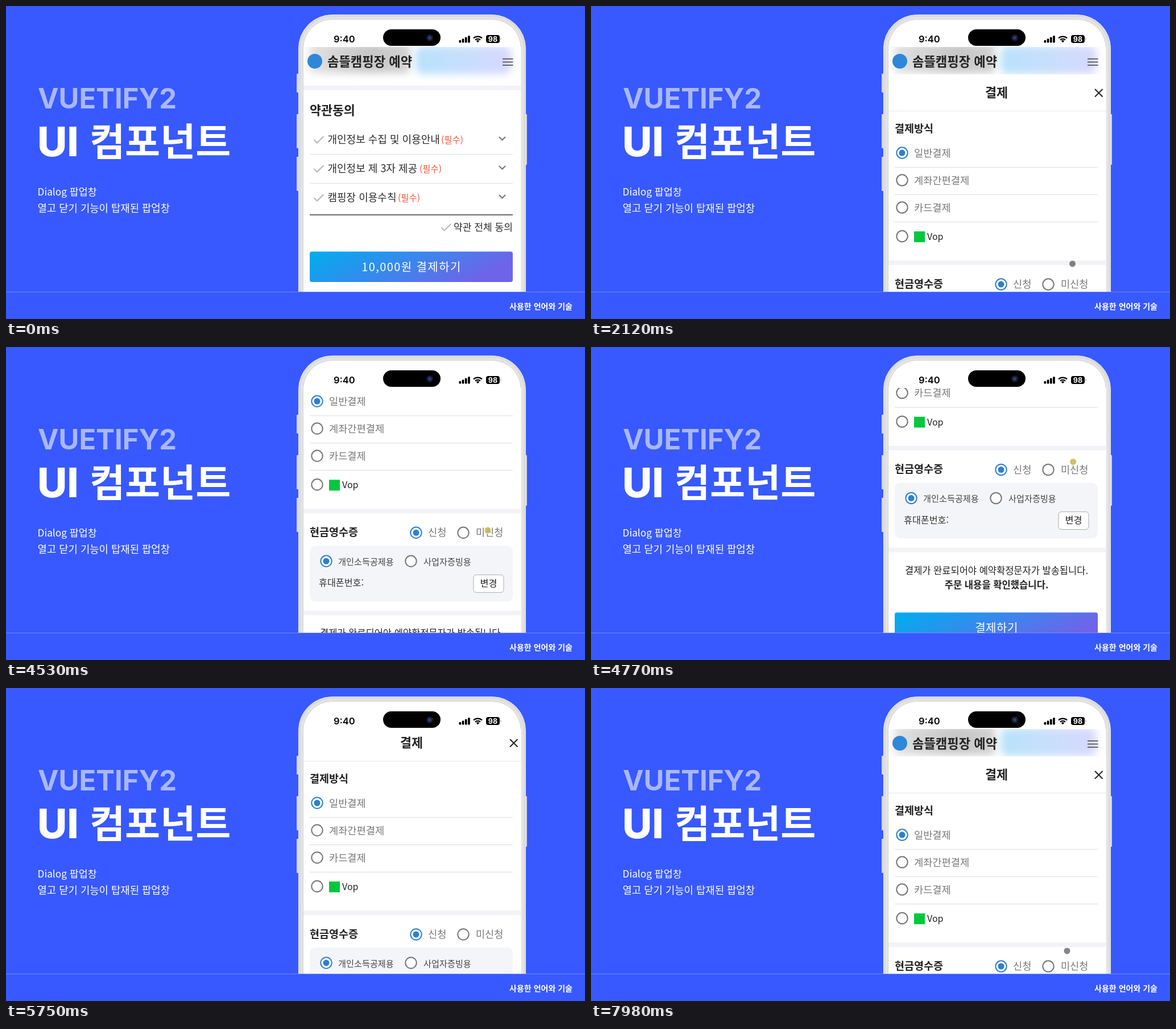
Recreate the animation shown at these times as an HTML page. Size 1018 px wide and 550 px high, loop 8000 ms.

```html
<!DOCTYPE html>
<html lang="ko">
<head>
<meta charset="utf-8">
<style>
  html, body { margin: 0; width: 100%; height: 100%; overflow: hidden; background: #3859ff; }
  svg { display: block; width: 1018px; height: 550px; font-family: "Noto Sans CJK KR", "Noto Sans CJK", sans-serif; }
  .latin { font-family: Inter, sans-serif; }
</style>
</head>
<body>
<svg viewBox="0 0 1018 550">
  <defs>
    <linearGradient id="accent" x1="0" y1="0" x2="1" y2=".3">
      <stop offset=".05" stop-color="#04abef"/><stop offset="1" stop-color="#6e64ea"/>
    </linearGradient>
    <linearGradient id="sky">
      <stop offset="0" stop-color="#b9e2fb"/><stop offset=".5" stop-color="#c8dffc"/><stop offset="1" stop-color="#d8d8ff"/>
    </linearGradient>
    <linearGradient id="ash">
      <stop offset="0" stop-color="#e2e2e2"/><stop offset=".6" stop-color="#c6c6c6"/><stop offset="1" stop-color="#d2d2d2"/>
    </linearGradient>
    <filter id="soft" x="-20%" y="-50%" width="140%" height="200%"><feGaussianBlur stdDeviation="7"/></filter>
    <clipPath id="screen"><rect x="523" y="72" width="382.500" height="431"/></clipPath>
  </defs>
  <rect width="1018" height="550" fill="#3859ff"/>
  <g id="titles"></g>
  <g id="phone"></g>
  <g clip-path="url(#screen)">
    <g id="page"></g>
    <g id="dialog"></g>
    <circle id="cursor" r="5.500"/>
  </g>
  <g id="footer"></g>
</svg>
<script>
const $ = id => document.getElementById(id);

// Drawing helpers
const text = (x, y, size, str, fill = '#222', weight = 400, extra = '') =>
  `<text x="${x}" y="${y}" font-size="${size}" fill="${fill}" font-weight="${weight}" ${extra}>${str}</text>`;
const rect = (x, y, w, h, fill, rx = 0, extra = '') =>
  `<rect x="${x}" y="${y}" width="${w}" height="${h}" fill="${fill}" rx="${rx}" ${extra}/>`;
const path = (d, stroke, width) =>
  `<path d="${d}" fill="none" stroke="${stroke}" stroke-width="${width}"/>`;
const rule = (y, color = '#dcdcdc', width = 1) => path(`M534 ${y}H891`, color, width);
const band = y => rect(523, y, 383, 8, '#f3f3f7');
const tick = (x, y) => path(`M${x} ${y}l5.500 5.500l11.500 -11.500`, 'currentColor', 2.2);
const radio = (x, y, on) => {
  const color = on ? '#2b80d0' : '#757575';
  return `<circle cx="${x}" cy="${y}" r="9.700" fill="#fff" stroke="${color}" stroke-width="2"/>` +
    (on ? `<circle cx="${x}" cy="${y}" r="5.500" fill="${color}"/>` : '');
};
const wideButton = (y, label, spacing) =>
  rect(534, y, 357, 53.5, 'url(#accent)', 4) +
  text(713, y + 34, 20, label, '#fff', 300, `text-anchor="middle" letter-spacing="${spacing}"`);

$('titles').innerHTML =
  text(56, 180, 49, 'VUETIFY2', '#a9b8ff', 700, 'class="latin"') +
  text(55, 264, 72, 'UI', '#fff', 800, 'class="latin"') +
  text(147, 263, 67.5, '컴포넌트', '#fff', 900) +
  text(55.5, 333, 17.3, 'Dialog 팝업창', '#fff', 500) +
  text(55.5, 362, 17.8, '열고 닫기 기능이 탑재된 팝업창', '#fff', 300);

$('footer').innerHTML =
  rect(0, 503, 1018, 47, '#3859ff') + rect(0, 502, 1018, 1, '#7189ff') +
  text(996, 533, 14, '사용한 언어와 기술', '#fff', 900, 'text-anchor="end"');

const sideButtons = [[511, 119, 33], [511, 190, 60], [511, 265, 60], [912, 190, 89]];
const signal = [0, 1, 2, 3].map(i => rect(796.5 + i * 5.2, 60 - i * 2.6, 3.7, 4.5 + i * 2.6, '#000', 1));
$('phone').innerHTML =
  sideButtons.map(([x, y, h]) => rect(x, y, 4, h, '#cfd1da', 1)).join('') +
  rect(514.5, 15.5, 399, 560, '#dadada', 59, 'stroke="#ececea"') +
  rect(518, 19, 392, 560, '#e4e4e2', 56) +
  rect(522.5, 23.5, 383, 560, '#fff', 51, 'stroke="#d3d3d3"') +
  rect(663, 41, 101, 29, '#000', 14.5) +
  '<circle cx="745" cy="56" r="6" fill="#171b2e"/><circle cx="745" cy="56" r="3" fill="#2c3c7c"/>' +
  text(576, 64, 16.5, '9:40', '#000', 600, 'class="latin"') + signal.join('') +
  path('M822 56.500a11 11 0 0 1 15 0M825 59.700a6.700 6.700 0 0 1 9 0', '#000', 2.3) +
  '<path d="M826.800 61.300a4 4 0 0 1 5.400 0l-2.700 3z"/>' +
  rect(844, 51, 24, 14, '#000', 4) + rect(869, 56, 1.5, 4, '#aaa', 1) +
  text(856, 62.5, 12.5, '98', '#fff', 700, 'class="latin" text-anchor="middle"');

const terms = [['개인정보 수집 및 이용안내', 765], ['개인정보 제 3자 제공', 727], ['캠핑장 이용수칙', 689]];
$('page').innerHTML =
  rect(523, 72, 383, 431, '#fff') +
  rect(533, 66, 178, 52, 'url(#ash)', 8, 'filter="url(#soft)"') +
  rect(720, 70, 169, 50, 'url(#sky)', 14, 'filter="url(#soft)"') +
  '<circle cx="543" cy="97" r="13" fill="#2f87d8"/>' +
  text(565, 105.5, 22.2, '솜뜰캠핑장 예약', '#222', 900) +
  path('M873 93H891.500M873 98.500H891.500M873 104H891.500', '#666', 2) +
  band(140) +
  text(534, 191, 21.7, '약관동의', '#222', 600) +
  terms.map(([label, x], i) => {
    const y = 51 * i;
    return tick(541.5, y + 235) + text(565.5, y + 241, 18, label, '#2a2a2a', 300) +
      text(x, y + 241, 15.5, '(필수)', '#f4583c', 300) +
      path(`M867 ${y + 230}l5.500 5.500l5.500 -5.500`, '#777', 2.2);
  }).join('') +
  rule(260.5) + rule(311.5) + rule(367, '#3c3c3c', 1.7) +
  tick(765, 389) + text(891, 395, 17.1, '약관 전체 동의', '#2a2a2a', 300, 'text-anchor="end"') +
  wideButton(431.5, '10,000원 결제하기', 1.4);

const methods = ['일반결제', '계좌간편결제', '카드결제'];
$('dialog').innerHTML =
  rect(523, 64, 383, 760, '#fff') +
  text(713, 104, 21.8, '결제', '#222', 600, 'text-anchor="middle"') +
  path('M886 90l13.500 13.500M899.500 90l-13.500 13.500', '#222', 2) +
  rect(523, 128, 383, 1, '#e6e6ea') +
  text(534, 166, 18.5, '결제방식', '#222', 600) +
  methods.map((label, i) => radio(547, 202 + 48 * i, i === 0) +
    text(568, 208.5 + 48 * i, 17.6, label, '#777', 300) + rule(227.5 + 48 * i)).join('') +
  radio(547, 348.5) + rect(568, 340, 19, 19, '#03c83d') + text(591, 355, 16, 'Vop') +
  band(391) +
  text(534, 438.5, 18.5, '현금영수증', '#222', 600) +
  radio(721, 433, true) + text(742, 439, 17.6, '신청', '#777', 300) +
  radio(804, 433) + text(826, 439, 17.5, '미신청', '#777', 300) +
  rect(534, 456, 357, 98, '#f4f5f8', 10) +
  radio(563, 483, true) + text(584, 489.5, 15.2, '개인소득공제용', '#444', 300) +
  radio(712, 483) + text(734, 489.5, 15.2, '사업자증빙용', '#444', 300) +
  text(550, 527, 16.2, '휴대폰번호:', '#333', 300) +
  rect(822, 507, 53, 31, '#fff', 5, 'stroke="#aaa"') +
  text(848.5, 527.5, 16.3, '변경', '#222', 400, 'text-anchor="middle"') +
  band(570) +
  text(713, 616, 16.5, '결제가 완료되어야 예약확정문자가 발송됩니다.', '#222', 300, 'text-anchor="middle"') +
  text(713, 641, 16.6, '주문 내용을 확인했습니다.', '#222', 600, 'text-anchor="middle"') +
  wideButton(684, '결제하기', 0.5);

// Motion
const clamp = v => Math.min(1, Math.max(0, v));
const smooth = p => p * p * (3 - 2 * p);
const easeOut = p => 1 - (1 - p) ** 2;
const speedUp = p => p ** 1.5;
const span = (t, from, to) => clamp((t - from) / (to - from));

// from ms, to ms, start x, start y, end x, end y, easing
const moves = [
  [1280, 1520, 841, 387, 846.5, 453, smooth],
  [4090, 4890, 846.5, 453, 848, 133, speedUp],
  [4900, 5060, 848, 133, 850, 121, easeOut],
  [5220, 5750, 850, 121, 856, 515, smooth],
  [5970, 6240, 870, 515, 893, 97, smooth],
  [6666, 7080, 893, 97, 837, 462, smooth],
];
const presses = [[930, 1050], [1880, 1915], [4090, 4890], [5220, 5750], [6290, 6340], [7790, 7825]];

function cursorAt(t) {
  if (t < moves[0][0]) {
    const p = easeOut(span(t, 220, 700)), q = 1 - p;
    return [912 * q * q + 2 * 855 * p * q + 841 * p * p, 408 * q * q + 2 * 376 * p * q + 387 * p * p];
  }
  const [from, to, x0, y0, x1, y1, ease] = moves.filter(m => m[0] <= t).pop();
  const p = ease(span(t, from, to));
  return [x0 + (x1 - x0) * p, y0 + (y1 - y0) * p];
}

const DIALOG_HEIGHT = 439, SCROLL_END = 280;
function slideAt(t) {
  if (t < 6340) return 1 - easeOut(span(t, 1907, 2240));
  if (t < 7790) return easeOut(span(t, 6340, 6650));
  return 1 - easeOut(span(t, 7785, 8090));
}

function scrollAt(t, y) {
  const pulled = distance => Math.max(0, distance - 15) * 0.92;
  if (t < 4090 || t > 5750) return 0;
  if (t < 4890) return Math.min(SCROLL_END, pulled(453 - y));
  return t < 5220 ? SCROLL_END : Math.max(0, SCROLL_END - pulled(y - 121));
}

function draw() {
  const t = performance.now() % 8000;
  const [x, y] = cursorAt(t);
  const pressed = presses.some(([from, to]) => t >= from && t < to);
  const cursor = $('cursor');
  cursor.setAttribute('cx', x);
  cursor.setAttribute('cy', y);
  cursor.setAttribute('fill', pressed ? '#c3b84e' : '#222');
  cursor.setAttribute('opacity', t < 220 ? 0 : pressed ? 0.85 : 0.55);
  $('page').setAttribute('color', t < 1050 ? '#bababa' : '#2b80d0');
  $('dialog').setAttribute('transform', `translate(0 ${slideAt(t) * DIALOG_HEIGHT - scrollAt(t, y)})`);
  requestAnimationFrame(draw);
}
draw();
</script>
</body>
</html>
```
